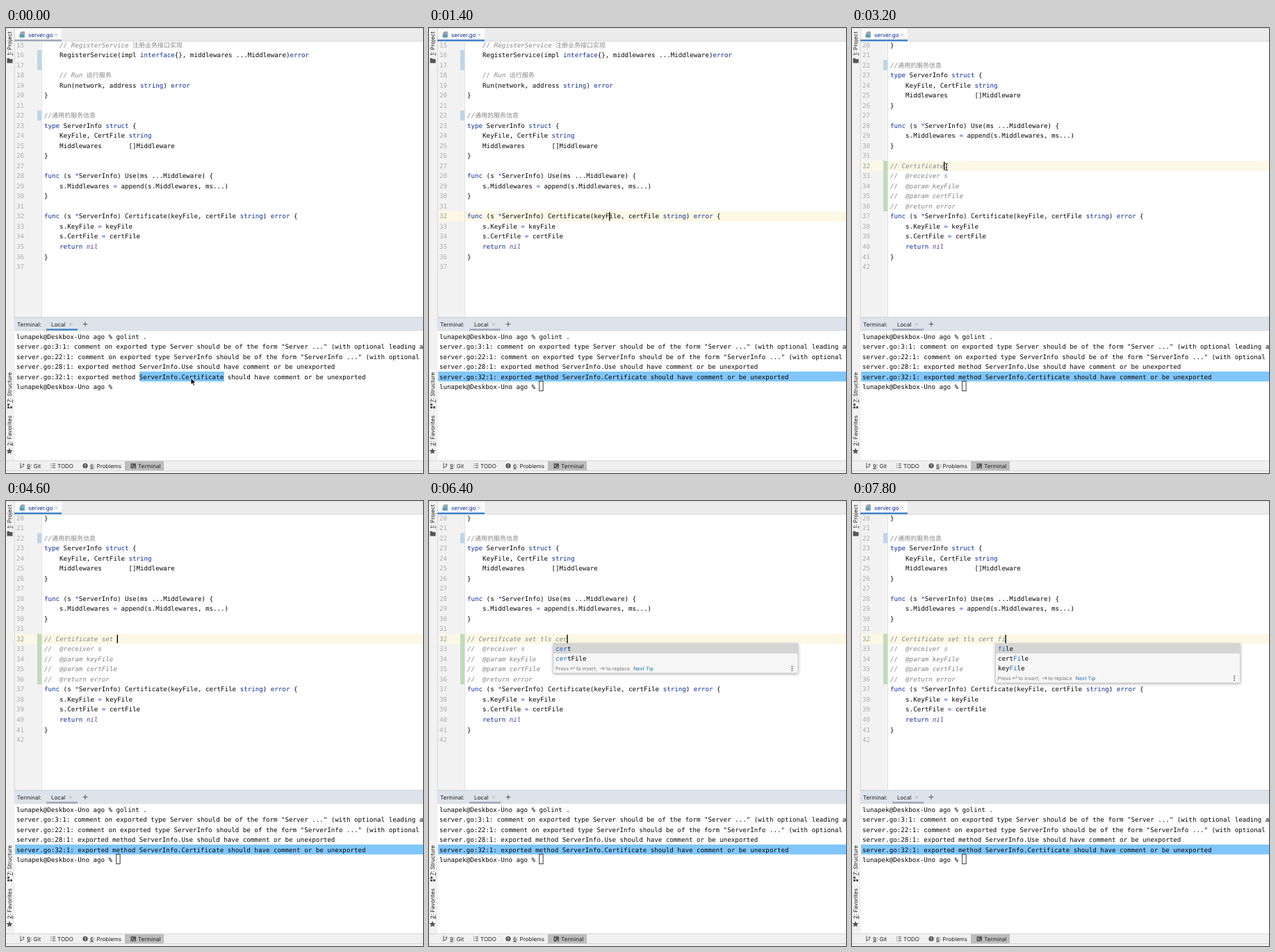
Recreate the animation shown at these times as an HTML page. Size 600x641 px, loop 8000 ms.

```html
<!DOCTYPE html>
<html lang="en">
<head>
<meta charset="utf-8">
<title>Editor and linter</title>
<style>
  html, body { margin: 0; width: 100%; height: 100%; overflow: hidden; background: #fff; }
  svg { display: block; width: 600px; height: 641px; }
  text { white-space: pre; text-rendering: geometricPrecision; fill: #080808; }
  .mono { font: 9.18px "DejaVu Sans Mono", monospace; }
  .ui { font: 8px Inter, sans-serif; fill: #222; }
  .tip { font: 7.25px Inter, sans-serif; fill: #777; }
  .num { fill: #adadad; }
  .kw { fill: #0b2f9e; }
  .op { fill: #1a4fd0; }
  .nil { fill: #59399a; font-style: italic; }
  .com { fill: #858585; font-style: italic; }
  .cjk { font: 9px "Noto Sans CJK SC", "Noto Sans CJK", sans-serif; }
  .hit { fill: #1a6fc4; }
  .u { text-decoration: underline; }
  .line { fill: none; stroke: #555; stroke-width: 1; }
  .pop { filter: drop-shadow(0 1.5px 2px rgba(0, 0, 0, .32)); }
</style>
</head>
<body>
<svg viewBox="0 0 600 641">
  <defs><clipPath id="pane"><rect x="12" y="19.5" width="588" height="397"/></clipPath></defs>
  <g id="editor" clip-path="url(#pane)"></g>
  <g id="chrome"></g>
  <g id="terminal"></g>
  <g id="overlay"></g>
</svg>
<script>
const STEP = 200, LOOP = 8000;
const CHAR = 5.527, ROW = 14.52, CODE_X = 55, TERM_X = 15;

const code = `    // RegisterService 注册业务接口实现
    RegisterService(impl interface{}, middlewares ...Middleware)error

    // Run 运行服务
    Run(network, address string) error
}

//通用的服务信息
type ServerInfo struct {
    KeyFile, CertFile string
    Middlewares       []Middleware
}

func (s *ServerInfo) Use(ms ...Middleware) {
    s.Middlewares = append(s.Middlewares, ms...)
}

func (s *ServerInfo) Certificate(keyFile, certFile string) error {
    s.KeyFile = keyFile
    s.CertFile = certFile
    return nil
}
`.split('\n');
const doc = ['// Certificate', '//  @receiver s', '//  @param keyFile', '//  @param certFile', '//  @return error'];
const prompt = 'lunapek@Deskbox-Uno ago % ';
const output = [
  prompt + 'golint .',
  'server.go:3:1: comment on exported type Server should be of the form "Server ..." (with optional leading article)',
  'server.go:22:1: comment on exported type ServerInfo should be of the form "ServerInfo ..." (with optional leading article)',
  'server.go:28:1: exported method ServerInfo.Use should have comment or be unexported',
  'server.go:32:1: exported method ServerInfo.Certificate should have comment or be unexported',
  prompt
];

// Times in ms; each entry holds until the next one.
const LINE_SELECTED = 400, EDITOR_FOCUS = 1200, DOC_INSERTED = 1800, CARET_TO_DOC = 3000;
const typing = [
  [0, ''], [3800, ' '], [4000, ' s'], [4200, ' se'], [4400, ' set'], [4600, ' set '],
  [4800, ' set tl'], [5000, ' set tls'], [5400, ' set tls '], [5800, ' set tls c'],
  [6000, ' set tls ce'], [6200, ' set tls cer'], [6600, ' set tls cert'],
  [7000, ' set tls cert '], [7400, ' set tls cert f'], [7600, ' set tls cert fi']
];
const popups = [
  [0, null], [4200, ['set']], [4400, null], [4800, ['tls']], [5000, null],
  [6000, ['cert', 'certFile']], [6800, null], [7600, ['file', 'certFile', 'keyFile']]
];
const pointer = [
  [0, ['arrow', 266, 504]], [600, ['arrow', 268, 455]], [800, ['beam', 274, 330]],
  [1000, ['beam', 277, 268]], [1200, ['beam', 261, 270]], [1400, null],
  [2600, ['beam', 210, 236]], [2800, ['beam', 150, 202]], [3000, ['beam', 136, 200]], [3400, null]
];

const at = (table, t) => table.filter(([start]) => start <= t).pop()[1];
const layer = id => document.getElementById(id);
const rect = (x, y, w, h, fill, more = '') =>
  `<rect x="${x}" y="${y}" width="${w}" height="${h}" fill="${fill}" ${more}/>`;
const text = (x, y, body, cls = 'mono', more = '') => `<text x="${x}" y="${y}" class="${cls}" ${more}>${body}</text>`;
const path = (d, more = '') => `<path d="${d}" class="line" ${more}/>`;
const span = (cls, body) => `<tspan class="${cls}">${body}</tspan>`;
const cross = (x, y) => path(`M${x - 2} ${y - 2}l4 4m0-4l-4 4`, 'style="stroke:#aaa;stroke-width:.8"');

function highlight(line) {
  const cut = line.indexOf('//');
  if (cut >= 0) {
    const comment = line.slice(cut).replace(/[\u4e00-\u9fff]+/g, s => span('cjk', s));
    return line.slice(0, cut) + span('com', comment);
  }
  return line.replace(/\b(func|type|struct|interface|string|error|return)\b|\bnil\b|[*=]/g,
    (s, word) => span(word ? 'kw' : s === 'nil' ? 'nil' : 'op', s));
}

function drawEditor(t) {
  const inserted = t >= DOC_INSERTED;
  const first = inserted ? 20 : 15;
  let lines = code;
  if (inserted) {
    const comments = [doc[0] + at(typing, t), ...doc.slice(1)];
    lines = [...code.slice(5, 17), ...comments, ...code.slice(17)];
  }
  const top = n => 17.2 + (n - first) * ROW;
  const marker = (from, to, color) => rect(45, top(from), 6, (to - from + 1) * ROW, color);

  let active = 0, column = 37;
  if (t >= CARET_TO_DOC) {
    active = 32;
    column = doc[0].length + at(typing, t).length;
  } else if (t >= EDITOR_FOCUS) active = inserted ? 37 : 32;

  let out = rect(12, 19, 588, 398, '#fff') + rect(12, 19, 39, 398, '#f2f2f2');
  if (active) out += rect(13, top(active), 587, ROW, '#fcf8e5');
  out += rect(51, 19, .7, 398, '#d6d6d6');
  if (!inserted) out += marker(16, 17, '#bcd6ea');
  out += marker(22, 22, '#bcd6ea');
  if (inserted) out += marker(32, 36, '#bfdcb9');
  lines.forEach((line, i) => {
    const y = 27.6 + i * ROW, n = first + i;
    out += text(15, y, n, 'mono num', n === active ? 'style="fill:#999"' : '');
    out += text(CODE_X, y, highlight(line));
  });
  if (active) out += rect(CODE_X + column * CHAR - .4, top(active) + 1.2, 1.4, 12, '#000');
  layer('editor').innerHTML = out;
}

function drawTerminal(t) {
  const focused = t < EDITOR_FOCUS;
  let out = rect(12, 16.6, 68, 2.6, focused ? '#9ca7b8' : '#4083c9');
  out += rect(58, 433.3, 45, 2.4, focused ? '#4083c9' : '#9ca7b8');
  out += t < LINE_SELECTED ? rect(192, 494.8, 122, 14.4, '#80c6fb') : rect(13, 494.8, 587, 14.4, '#80c6fb');
  output.forEach((line, i) => out += text(TERM_X, 447.8 + i * 14.5, line));
  if (!focused) out += rect(158.7, 508.7, 5.4, 14, 'none', 'stroke="#222" stroke-width=".9"');
  layer('terminal').innerHTML = out;
}

function popup(items, typed) {
  const word = typed.split(' ').pop();
  const x = CODE_X + (doc[0].length + typed.length - word.length) * CHAR - 3.2;
  const height = 14 * items.length + 14.5, foot = 206 + 14 * items.length;
  let out = rect(x, 205.5, 352, height, '#f6f6f6', 'stroke="#c4c4c4" stroke-width=".6" class="pop"');
  out += rect(x, 206, 352, 13.6, '#d5d5d5');
  items.forEach((item, i) => out += text(x + 3.4, 215.8 + 14 * i,
    item.replace(new RegExp(word, 'i'), s => span('hit', s))));
  const y = foot + 9.8;
  [[3, 'Press'], [33, 'to insert,'], [76, 'to replace']].forEach(([dx, s]) => out += text(x + dx, y, s, 'tip'));
  out += path(`M${x + 30} ${y - 6}v3.4h-5.5m2-2l-2 2l2 2`, 'style="stroke:#777;stroke-width:.7"');
  out += path(`M${x + 67} ${y - 2.6}h5.5m-2-2l2 2l-2 2m2.8-4.2v4.4`, 'style="stroke:#777;stroke-width:.7"');
  out += text(x + 115, y, 'Next Tip', 'tip hit', 'style="fill:#2470b3"');
  for (const dy of [-3, 0, 3]) out += rect(x + 342.7, y - 3.5 + dy, 1.6, 1.6, '#555');
  return out;
}

function mouse([kind, x, y]) {
  const shape = kind === 'arrow'
    ? '<path d="M0 0v9.6l2.2-2 1.6 3.6 1.7-.8-1.6-3.4h3z" fill="#000" stroke="#fff" stroke-width=".8"/>'
    : path('M-2-5q2 0 2 1.5q0-1.5 2-1.5M0-4V4M-2 5q2 0 2-1.5q0 1.5 2 1.5M-1 1h2', 'style="stroke:#222"');
  return `<g transform="translate(${x} ${y})">${shape}</g>`;
}

function drawOverlay(t) {
  const items = at(popups, t), pos = at(pointer, t);
  layer('overlay').innerHTML = (items ? popup(items, at(typing, t)) : '') + (pos ? mouse(pos) : '');
}

function drawChrome() {
  const side = (y, key, label) => text(0, 0, span('u', key) + ': ' + label, 'ui', `transform="translate(8 ${y}) rotate(-90)"`);
  let out = rect(0, 0, 12, 641, '#f2f2f2') + rect(12, 0, 588, 19.3, '#ececec');
  out += rect(12, 0, 68, 19, '#fafafa') + rect(80, 18.6, 520, .8, '#d0d0d0') + rect(11.8, 0, .8, 623, '#cfcfcf');
  out += rect(0, 0, 600, .6, '#cfcfcf');
  out += side(39.5, '1', 'Project') + side(539.5, '7', 'Structure') + side(602, '2', 'Favorites');
  out += '<path d="M1.5 43.5h3l1 1.2h4v5.8h-8z" fill="#555"/>';
  out += rect(2, 541, 3, 3, '#555') + rect(2, 545, 3, 3, '#555') + rect(6, 545, 3, 3, '#555');
  out += '<path d="M5 605l1.3 3 3.2.3-2.4 2.1.7 3.2-2.8-1.7-2.8 1.7.7-3.2-2.4-2.1 3.2-.3z" fill="#555"/>';

  out += '<path d="M22 5h5v9h-7v-7z" fill="#9aa7b0"/>' + rect(19.5, 9.5, 6, 3.5, '#4a9fc0');
  out += text(32, 12.5, 'server.go', 'ui kw') + cross(72, 9.7);

  out += rect(12, 416.4, 588, 20, '#dde3ea') + rect(12, 416.4, 588, .8, '#c6cbd2');
  out += rect(12, 436, 588, 187, '#fff') + rect(12, 435.6, 588, .6, '#cbd0d6');
  out += text(16, 429.5, 'Terminal:', 'ui') + text(65, 429.5, 'Local', 'ui') + cross(93, 426.7);
  out += path('M110.5 426.5h7m-3.5-3.5v7');

  out += rect(0, 623, 600, 15, '#f0f0f0') + rect(0, 622.8, 600, .8, '#cfcfcf');
  out += rect(0, 638, 600, 3, '#f4f4f4') + rect(0, 637.4, 600, .8, '#c8c8c8');
  out += rect(171, 624, 56, 13.4, '#bdbdbd');
  out += path('M21 626.5v8m0-2h2.5q1.5 0 1.5-1.5v-3m-1.5 1.2l1.5-1.5 1.5 1.5');
  out += text(30, 633.5, span('u', '9') + ': Git', 'ui');
  out += path('M64 628h1m1.5 0h4.5m-7 2.7h1m1.5 0h4.5m-7 2.7h1m1.5 0h4.5') + text(74, 633.5, 'TODO', 'ui');
  out += '<circle cx="114" cy="630.7" r="3.6" fill="#555"/>' + rect(113.5, 628.4, 1, 2.8, '#fff') + rect(113.5, 632, 1, 1, '#fff');
  out += text(121, 633.5, span('u', '6') + ': Problems', 'ui');
  out += rect(179.5, 627.3, 7.5, 7, '#555') + path('M181 629l1.5 1.5-1.5 1.5m2.5 .8h2.2', 'style="stroke:#fff;stroke-width:.8"');
  out += text(190, 633.5, 'Terminal', 'ui');
  layer('chrome').innerHTML = out;
}

let shown = -1;
function tick() {
  const step = Math.floor(performance.now() % LOOP / STEP);
  if (step !== shown) {
    shown = step;
    for (const draw of [drawEditor, drawTerminal, drawOverlay]) draw(step * STEP);
  }
  requestAnimationFrame(tick);
}
drawChrome();
tick();
</script>
</body>
</html>
```
